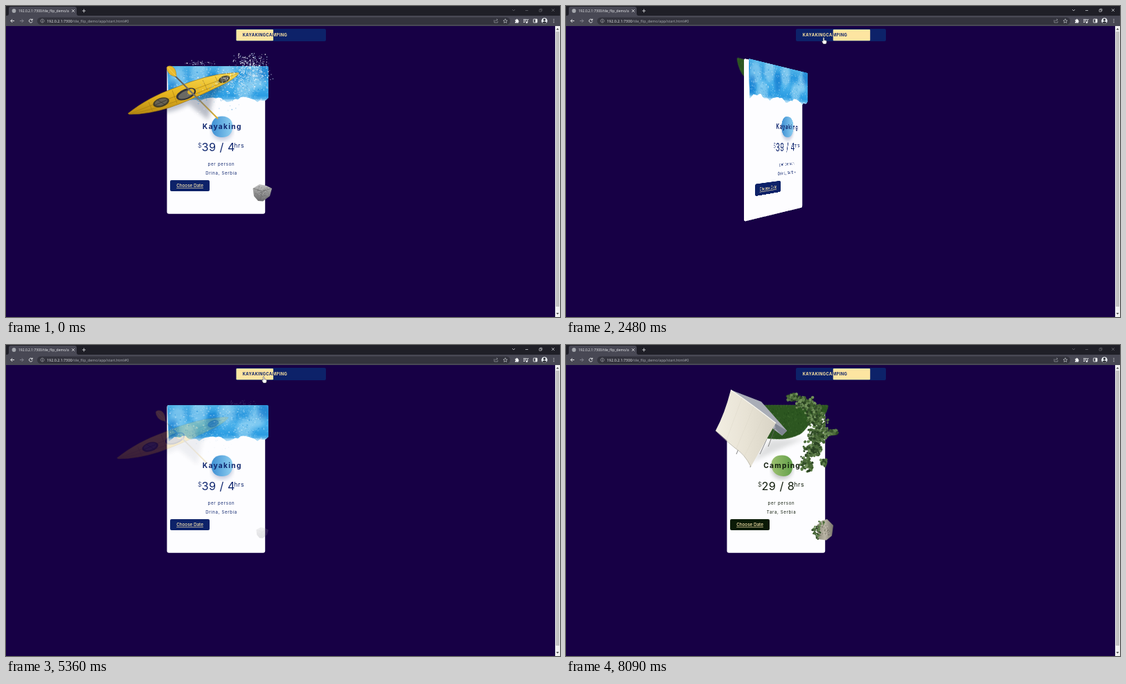
An HTML page that plays this animation: 800x450 px, repeating every 8120 ms.

```html
<!DOCTYPE html>
<html lang="en">
<head>
<meta charset="utf-8">
<title>Card flip</title>
<style>
  html, body { margin: 0; width: 100%; height: 100%; overflow: hidden; background: #170045; }
  #stage { position: fixed; inset: 0; overflow: hidden; contain: strict; }
  svg { position: absolute; left: 0; top: 0; width: 800px; height: 450px; overflow: hidden; transform-origin: 303px 194px; }
  text { font-family: Inter, "Open Sans", sans-serif; }
  .ui { font-family: "Open Sans", "Noto Sans", sans-serif; }
</style>
</head>
<body>
<div id="stage"></div>
<script>
const LOOP = 8120, CLICKS = [1800, 4000, 6166];
const stage = document.getElementById('stage');
let seed = 11;
const rnd = (a = 0, b = 1) => a + (b - a) * (seed = seed * 16807 % 2147483647) / 2147483647;
const clamp = x => Math.max(0, Math.min(1, x));
const smooth = x => (x = clamp(x), x * x * (3 - 2 * x));
const lerp = (a, b, k) => a + (b - a) * k;
const times = (n, f) => Array.from({ length: n }, (_, i) => f(i)).join('');
const pick = list => list[Math.floor(rnd(0, list.length))];
const gauss = () => rnd(-1, 1) + rnd(-1, 1);

function layer(html) {
  stage.insertAdjacentHTML('beforeend', `<svg viewBox="0 0 800 450">${html}</svg>`);
  return stage.lastElementChild;
}
const path = (d, fill, more = '') => `<path d="${d}" fill="${fill}" ${more}/>`;
const line = (d, color, w = 1, more = '') => path(d, 'none', `stroke="${color}" stroke-width="${w}" ${more}`);
const rect = (x, y, w, h, fill, r = 0, more = '') =>
  `<rect x="${x}" y="${y}" width="${w}" height="${h}" rx="${r}" fill="${fill}" ${more}/>`;
const oval = (x, y, rx, ry, fill, turn = 0, more = '') =>
  `<ellipse cx="${x}" cy="${y}" rx="${rx}" ry="${ry}" fill="${fill}" transform="rotate(${turn} ${x} ${y})" ${more}/>`;
const text = (x, y, size, str, fill, more = '') =>
  `<text x="${x}" y="${y}" font-size="${size}" fill="${fill}" ${more}>${str}</text>`;
const grad = (id, colors, more = '') => `<linearGradient id="${id}" ${more}>` +
  colors.map((c, i) => `<stop offset="${i / (colors.length - 1)}" stop-color="${c}"/>`).join('') + '</linearGradient>';
const DOWN = 'x1="0" y1="0" x2="0" y2="1"';

// Browser window and toggle
const BAR = '#484854';
const label = (fill, more) => text(341.8, 44.2, 5.8, 'KAYAKINGCAMPING', fill,
  `font-weight="700" letter-spacing=".38" ${more}`);
layer(`
  <defs>
    <clipPath id="tabClip"><rect x="18" y="0" width="73" height="14"/></clipPath>
    <clipPath id="pillClip"><rect class="pill" x="332.5" y="33" width="53.500" height="18"/></clipPath>
    <filter id="soft"><feGaussianBlur stdDeviation="3"/></filter>
    ${grad('waterFill', ['#58b8e9', '#2998df', '#46b0eb', '#2a9ce2', '#c9ecfb'], DOWN)}
    ${grad('hull', ['#f8d84f', '#e6b51f', '#b98a12'], DOWN)}
    ${grad('shaft', ['#55585c', '#77736a', '#e5b428'], 'gradientUnits="userSpaceOnUse" x1="243" y1="100" x2="306" y2="163"')}
    ${grad('canvasFill', ['#f2eee2', '#e8e3d5', '#d8d3c5'])}
    ${grad('rockFill', ['#c3c3c3', '#909090', '#6e6e70'], DOWN)}
    ${grad('mossRock', ['#8b8b78', '#b9b4a4', '#77736a'])}
    ${grad('ball0', ['#3e8fd3', '#8fd0f1'])}
    ${grad('ball1', ['#9cc070', '#63a04a'])}
  </defs>
  ${rect(0, 0, 800, 14, '#1f1f27')}${rect(0, 14, 800, 15, BAR)}
  ${path('M1 14Q4 14 4 11V4Q4 1 7 1H99Q102 1 102 4V11Q102 14 105 14Z', BAR)}
  ${oval(11.5, 7, 2.9, 2.9, '#a4a7ad')}
  ${text(18, 8.9, 5, '192.0.2.1:7300/tile_flip_demo/app/', '#f0f1f3', 'class="ui" clip-path="url(#tabClip)"')}
  ${line('M95 5L99 9M99 5L95 9', '#f0f1f3', .7)}
  ${line('M110 7H115M112.500 4.500V9.500', '#dfe1e5', .8)}
  <g id="frame">
    ${line('M731 5L733 7L735 5', '#dfe1e5', .7)}${line('M750 6.500H754', '#dfe1e5', .7)}
    ${line('M770 5.200H773V8.200H770ZM771 5V4.200H774V7.200H773', '#dfe1e5', .6)}
    ${line('M788 4L792 8M792 4L788 8', '#dfe1e5', .7)}
  </g>
  ${line('M12 21.500H7M9.300 19L6.800 21.500L9.300 24', '#f0f1f3', .9)}
  ${line('M20 21.500H25M22.700 19L25.200 21.500L22.700 24', '#8a8b96', .9)}
  ${line('M37.800 20A2.500 2.500 0 1 0 38.200 22.300M38.200 18.500V20.500H36.200', '#f0f1f3', .9)}
  ${rect(45, 16.5, 683, 10.5, '#33333d', 5.2)}
  ${line('M52.500 19A2.500 2.500 0 1 0 52.510 19M52.500 20V20.700M52.500 21.200V23', '#c4c7cc', .6)}
  ${text(59, 23.6, 5.4, '192.0.2.1:7300<tspan fill="#a9acb2">/tile_flip_demo/app/start.html#0</tspan>', '#f0f1f3', 'class="ui"')}
  ${line('M705 20V24H710V22M706.500 22Q707 19.800 710 19.800M708.500 18.500L710 19.800L708.500 21.200', '#a9acb2', .6)}
  ${line('M721 18.600L721.900 20.800L724 21L722.400 22.400L722.900 24.500L721 23.300L719.100 24.500L719.600 22.400L718 21L720.100 20.800Z', '#d4d7dc', .6)}
  ${path('M735 20H736.500A1.200 1.200 0 0 1 739 20H740V21.500A1.200 1.200 0 0 1 740 23.500V24.500H735V23A1 1 0 0 0 735 21Z', '#f0f1f3')}
  ${line('M747 19.500H752M747 21.500H751M747 23.500H749.500M753 23.800V19.500H754.500', '#f0f1f3', .9)}${oval(752, 23.7, 1.2, 1.2, '#f0f1f3')}
  ${rect(761.5, 19, 5.5, 5, 'none', .5, 'stroke="#f0f1f3" stroke-width=".8"')}${rect(764.5, 19, 2.5, 5, '#f0f1f3')}
  ${oval(777.5, 21.5, 4.3, 4.3, '#e9edf2')}${oval(777.5, 20, 1.7, 1.8, '#30323a')}${path('M774.300 24.300Q777.500 20 780.700 24.300Q777.500 27 774.300 24.300Z', '#30323a')}
  ${[19.3, 21.5, 23.7].map(y => oval(791, y, .6, .6, '#f0f1f3')).join('')}
  ${rect(793, 29, 7, 421, '#f1f1f1')}${rect(794, 37, 5, 398, '#c1c1c1')}
  ${path('M794.500 34.500L796.500 32L798.500 34.500Z', '#505050')}${path('M794.500 444L796.500 446.500L798.500 444Z', '#505050')}
  ${rect(332, 33, 130, 18, '#0d2269', 2)}
  <rect class="pill" x="332.500" y="34" width="53.500" height="16.200" rx="1" fill="#fde5a1"/>
  ${label('#fde5a1', '')}${label('#0d2269', 'clip-path="url(#pillClip)"')}
`);

// Pictures along the top of each side
const flecks = (n, draw) => times(n, () => draw(rnd(235, 378), rnd(88, 137)));
const shore = times(37, i => `L${379 - i * 4} ${(135 + 3 * Math.sin(i * .55) + rnd(-2, 2)).toFixed(1)}`);
const water = `<clipPath id="sea"><path d="M233 89Q233 87 235 87H377Q379 87 379 89${shore}Z"/></clipPath>
  <g clip-path="url(#sea)">${rect(230, 85, 152, 60, 'url(#waterFill)')}
  ${[[248, 104], [278, 98], [318, 99], [362, 106], [345, 122], [262, 128]].map(([x, y]) =>
    oval(x, y, 12, 15, '#a6dcf6', 15, 'opacity=".6" filter="url(#soft)"')).join('')}
  ${[[298, 112], [240, 120], [372, 94]].map(([x, y]) => oval(x, y, 8, 13, '#0d73cb', 10, 'opacity=".6" filter="url(#soft)"')).join('')}
  ${flecks(450, (x, y) => oval(x, y, rnd(.4, 1.4), rnd(.4, 1.2), pick(['#fff', '#d4f1ff', '#1583d2']), 0, `opacity="${rnd(.1, .45)}"`))}
  ${rect(230, 136, 152, 9, '#fff', 0, 'opacity=".6" filter="url(#soft)"')}</g>`;
const lawn = 'M233 89Q233 87 235 87H377Q379 87 378 91Q374 104 365 109Q355 112 350 116Q344 125 338 129Q322 137 304 136Q282 136 268 127Q252 121 237 104Q233 101 233 97Z';
const grass = `<clipPath id="lawn"><path d="${lawn}"/></clipPath>${path(lawn, '#2c5620', 'stroke="#3e6a2c" stroke-dasharray=".7 .6"')}
  <g clip-path="url(#lawn)">${flecks(520, (x, y) => line(`M${x} ${y}l${rnd(-1, 1)} ${rnd(-3, -1.5)}`,
    pick(['#1f4518', '#3a642b', '#446f32', '#274d1e']), .6))}</g>`;

// Wording of each side
const mid = 'text-anchor="middle"';
const copy = (n, title, price, place, ink, button) => `
  ${oval(312, 180, 15, 14, ink, 0, 'opacity=".25" filter="url(#soft)"')}
  ${path(n ? 'M296.500 172Q298 159.500 312 159.500Q326 160 327.500 174Q327 190 314 190Q297 189 296.500 172Z'
           : 'M296.500 174Q298 159.500 312 159.500Q327 160 327.500 175Q326 190 312 190Q297 190 296.500 174Z', `url(#ball${n})`)}
  ${text(312.2, 178, 10.2, title, ink, mid + ' font-weight="700" letter-spacing="1.3"')}
  ${text(277, 205, 9, '$', ink, 'font-weight="300"')}
  ${text(282.5, 209.8, 16.2, price, ink, 'letter-spacing=".5"')}
  ${text(329.3, 204.8, 8.8, 'hrs', ink, 'letter-spacing=".6"')}
  ${text(311, 231, 6, 'per person', ink, mid + ' letter-spacing=".8"')}
  ${text(311, 244.2, 6, place, ink, mid + ' letter-spacing=".7"')}
  ${rect(237, 252, 57, 16, button, 2)}
  ${text(265.5, 262.2, 6.3, 'Choose Date', '#fde9b0', mid + ' font-weight="500" text-decoration="underline"')}`;

// Objects floating above the card
const drops = (n, x, y, sx, sy, colors) => times(n, () =>
  oval(x + gauss() * sx, y + gauss() * sy, rnd(.3, 1), rnd(.3, 1), pick(colors), 0, `opacity="${rnd(.4, 1)}"`));
const foam = ['#fff', '#d7e9f5', '#a3c4df'];
const kayak = `
  ${path('M205 152Q262 136 333 101L300 130L292 165L264 142Q232 160 205 152Z', '#0a1c38', 'opacity=".28" filter="url(#soft)"')}
  ${path('M176 155.500Q205 132 245 118Q290 99 325 97Q334 96 337 97Q331 106 302 119Q265 137 236 147Q205 157 178 156.800Z', 'url(#hull)', 'stroke="#8a6410" stroke-width=".6"')}
  ${line('M178 156Q250 128 336 97.500M181 156Q235 146 318 108M206 139L212 153M240 122L247 141M284 107L291 122M302 102L308 113', '#a27a13', .6)}
  ${oval(260, 127.5, 15, 7.5, '#34343a', -22)}${oval(260, 128, 12, 5, '#6a6963', -22)}${oval(267, 124, 5, 4, '#e1b52c', -22)}
  ${oval(224, 139.5, 12, 6.5, '#443f2a', -18)}${oval(224, 139, 9.5, 4.7, '#666154', -18)}
  ${oval(315, 106, 8.5, 4.7, '#443f2a', -20)}${oval(315, 105.7, 6.5, 3.2, '#696456', -20)}
  ${line('M216 143L232 136M219 136L230 143M309 108L321 103', '#2b2922', .6)}
  ${line('M243 100L306 163', 'url(#shaft)', 2)}
  ${path('M232 89Q234 85.500 240 87.500Q246 91 246 102Q239 102 235 97Q232 93 232 89Z', '#e9b92c', 'stroke="#a87d15" stroke-width=".5"')}
  ${line('M234 89L246 102', '#f8db70', .7)}`;
const splash = drops(420, 352, 88, 14, 11, foam) + drops(260, 339, 108, 24, 11, foam) +
  drops(90, 305, 125, 25, 18, ['#8fbfe2', '#fff', '#5ba4d8']) + drops(45, 281, 83, 13, 2.5, foam);
const rock = path('M356.500 264L366 258L376 260L384 264L381 275L371 282.500L364 282L358 275Z', 'url(#rockFill)') +
  times(90, () => oval(370 + gauss() * 5, 269 + gauss() * 5, .6, .5, pick(['#555', '#ccc', '#777']), 0, 'opacity=".6"')) +
  line('M357 264L370 268L383 264M370 268L367 281', '#666', .6);

const leaf = (x, y, r) => path(`M${x} ${y - r}q${r} ${r * .2} ${r * .9} ${r}q${-r * .4} ${r * .6} ${-r * .9} ${r * .9}q${-r} ${-r * .3} ${-r * .9} ${-r}q${r * .3} ${-r * .7} ${r * .9} ${-r * .9}Z`,
  pick(['#34502a', '#4c6b3b', '#5f7f4b', '#41602f', '#71905a', '#2a4322']), `transform="rotate(${rnd(0, 360)} ${x} ${y})"`);
const tent = `
  ${path('M267 170L296 137L345 135L300 155Z', '#202820', 'opacity=".14" filter="url(#soft)"')}
  ${path('M238 65L282 82L319 124L312 131L301 123Z', '#a9adb7')}
  ${path('M301 113L319 124L312 131L303 122Z', '#7f8592')}
  ${line('M302 120L292 147M290 136L280 158M268 168L266 177M234 132L232 139M250 148L246 158', '#666', .8)}
  ${path('M238 65Q270 87 303 113Q292 132 267 176Q257 156 244 149Q230 136 216 124Q229 100 238 65Z', 'url(#canvasFill)')}
  ${line('M238 65Q270 87 303 113', '#faf8f1', 1.2)}${line('M216 124Q229 137 244 149Q258 158 267 176', '#aaa594', .7)}
  ${line('M254 77Q243 106 232 137M271 89Q259 119 246 150M287 101Q274 128 258 160', '#d9d3c5', .4)}`;
const vine = [[327, 76, 6, 4], [345, 84, 10, 7], [358, 97, 11, 9], [365, 115, 11, 10], [364, 132, 11, 8], [385, 127, 5, 3], [357, 150, 10, 8], [348, 171, 7, 9], [372, 170, 3, 4]];
const leaves = vine.map(([x, y, sx, sy]) => times(sx * 10, () =>
  leaf(x + gauss() * sx * .75, y + gauss() * sy * .75, rnd(1.3, 3)))).join('');
const mossy = path('M362 261L370 254L377 252L386 261L384 276L376 282.500L364 281Z', 'url(#mossRock)') +
  times(60, () => oval(374 + gauss() * 4.5, 268 + gauss() * 6, .6, .8, pick(['#615e50', '#d0cabb']), 0, 'opacity=".6"')) +
  times(40, () => leaf(362 + gauss() * 3.4, 270 + gauss() * 6, rnd(1, 2))) + times(8, () => leaf(rnd(365, 373), rnd(254, 260), 1.5));

const backs = [water, grass].map(s => layer(s.replace(/sea|lawn/g, '$&Back')));
const card = layer(rect(232.4, 87, 141.8, 213.8, '#fdfdff', 3));
const covers = [water, grass].map(layer);
const copies = [
  copy(0, 'Kayaking', '39 / 4', 'Drina, Serbia', '#10276f', '#0d2269'),
  copy(1, 'Camping', '29 / 8', 'Tara, Serbia', '#101c0b', '#0a1a06')
].map(layer);

// Each object: centre, size when gone, offset when gone, opacity gain
const props = [
  [[kayak, 257, 127, 1, -22, 11, 1.7], [splash, 330, 100, .8, -14, 10, 1.5], [rock, 370, 270, .5, 0, 2, 1.5]],
  [[tent, 267, 121, .83, 0, 0, 2.4], [leaves, 354, 129, .5, -4, 3, 1.4], [mossy, 371, 268, .5, 0, 2, 1.4]]
].map(set => {
  const nodes = layer(set.map(p => `<g>${p[0]}</g>`).join('')).children;
  return set.map((p, i) => ({ el: nodes[i], at: p.slice(1) }));
});
const cursor = layer(`<g><g>${path('M0 0V8.500L2 6.700L3.400 9.600L4.700 9L3.400 6.200H6Z', '#fff', 'stroke="#222" stroke-width=".5"')}</g>
  <g>${path('M-1.800 -4Q-1 -5.500 0 -4V-.500Q3 -1 3.500 1Q3.500 4 2.200 5H-1.500L-3.500 1.500Q-3 0 -1.800 1Z', '#fff', 'stroke="#222" stroke-width=".5"')}</g></g>`).firstElementChild;

function pose(el, a, q, dx) {
  el.style.transform = `matrix3d(${a},0,0,${-q},0,1,0,0,0,0,1,0,${dx},0,0,1)`;
}
const show = (el, on) => el.style.visibility = on ? 'visible' : 'hidden';

// time, x, y of the pointer
const TRACK = [[900, 190, 452], [1600, 373, 50], [6220, 373, 50], [6720, 565, 102], [7450, 565, 102], [7850, 620, 455]];
function pointer(t) {
  const k = TRACK.findIndex(p => p[0] > t);
  show(cursor, k > 0);
  if (k < 1) return;
  const [t0, x0, y0] = TRACK[k - 1], [t1, x1, y1] = TRACK[k], e = smooth((t - t0) / (t1 - t0));
  const x = lerp(x0, x1, e), y = lerp(y0, y1, e);
  cursor.setAttribute('transform', `translate(${x} ${y})`);
  const hand = x > 332 && x < 440 && y > 33 && y < 51;
  cursor.children[0].style.display = hand ? 'none' : '';
  cursor.children[1].style.display = hand ? '' : 'none';
}

// The card widens as it turns; the picture and wording float in front of it
function flip(angle, from, to, dir) {
  const turned = angle > Math.PI / 2, side = turned ? to : from;
  const v = turned ? angle - Math.PI : angle, sin = Math.sin(v);
  const a = Math.cos(v) * (1 + Math.abs(sin));
  const q = -dir * sin / (dir < 0 ? 525 : 710);
  pose(card, a, q, 0);
  pose(covers[side], a, q, dir * 6 * sin);
  pose(copies[side], a, q, dir * 12.5 * sin);
  pose(backs[1 - side], -a, -q, -dir * 6 * sin);
  [0, 1].forEach(i => {
    show(covers[i], i === side);
    show(copies[i], i === side);
    show(backs[i], i !== side && Math.abs(sin) > .01);
  });
}

function draw() {
  const t = performance.now() % LOOP;
  const n = CLICKS.filter(c => c <= t).length;
  const to = n % 2, from = 1 - to, dir = to ? 1 : -1;
  const since = n ? t - CLICKS[n - 1] : 1e6;
  const slide = smooth(since / 330);
  document.querySelectorAll('.pill').forEach(p => p.setAttribute('x', lerp(332.5, 385.7, to ? slide : 1 - slide)));
  document.getElementById('frame').setAttribute('opacity', t > CLICKS[0] && t < 7860 ? 1 : .4);
  flip(Math.PI * smooth((since - 290) / 900), from, to, dir);

  const seen = [];
  seen[from] = clamp(1 - since / 300);
  seen[to] = 1 - (1 - clamp((since - 1300) / 400)) ** 2;
  props.forEach((set, i) => set.forEach(({ el, at: [x, y, small, dx, dy, gain] }) => {
    const gone = 1 - seen[i], k = lerp(1, small, gone);
    el.setAttribute('transform', `translate(${x + dx * gone} ${y + dy * gone}) scale(${k}) translate(${-x} ${-y})`);
    el.setAttribute('opacity', clamp((seen[i] - .15) * gain));
  }));
  pointer(t);
  requestAnimationFrame(draw);
}
draw();
</script>
</body>
</html>
```
